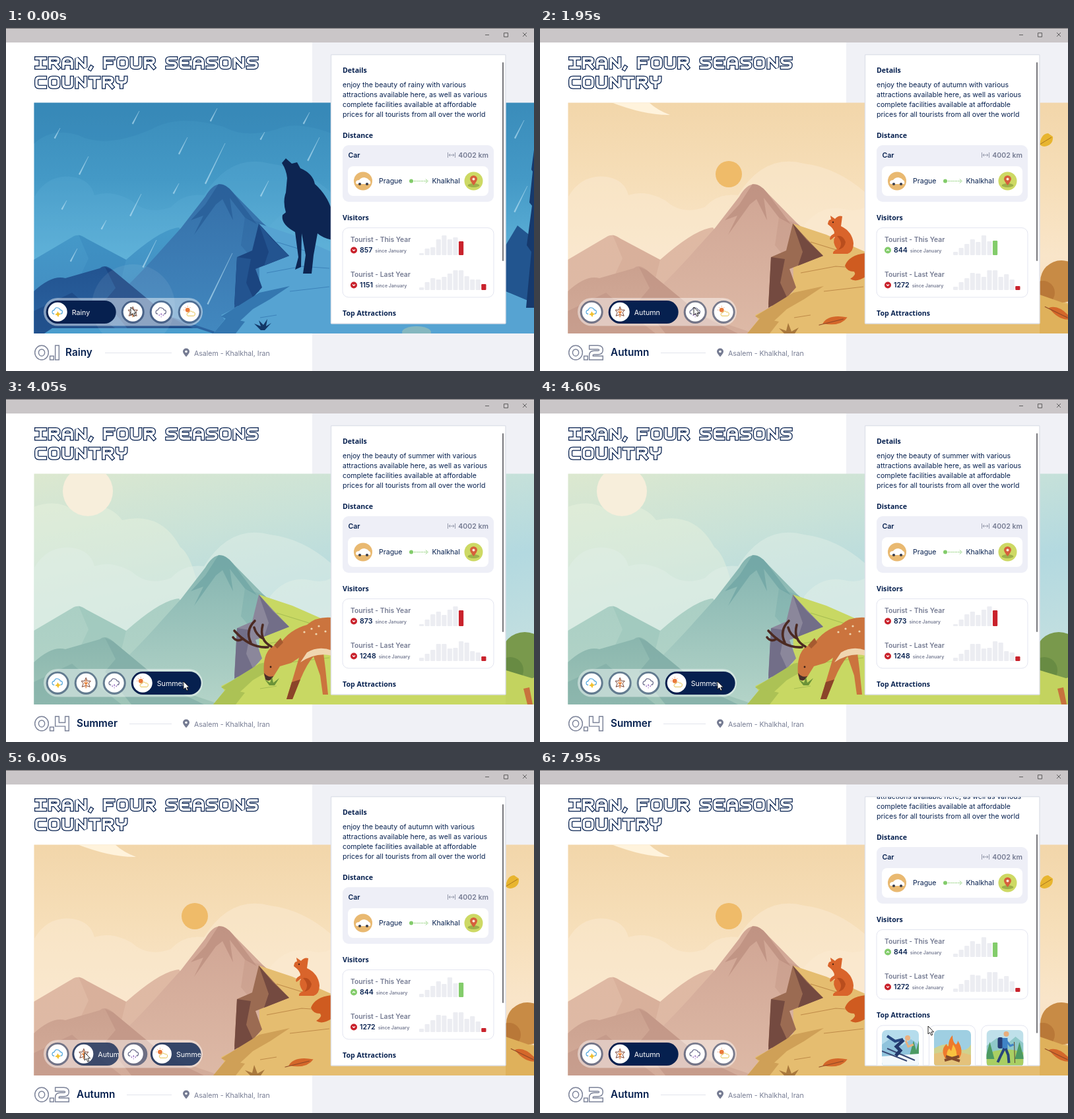
Animation of 800 by 521 pixels, one loop 8000 ms. Source, as an HTML page:

```html
<!DOCTYPE html>
<html lang="en">
<head>
<meta charset="utf-8">
<title>Four seasons</title>
<style>
html, body { margin: 0; width: 100%; height: 100%; overflow: hidden; background: #fff; }
svg { display: block; width: 100vw; height: 100vh; }
text { font: 400 10.55px Inter, sans-serif; fill: #06204f; }
.h { font: 700 10.6px "Open Sans", sans-serif; }
.b { font-weight: 600; }
.g { fill: #757b92; }
.title { font-weight: 600; font-size: 10.3px; }
.small { font-size: 7px; font-weight: 600; fill: #757b92; }
.name { font-size: 15.3px; font-weight: 600; }
.nav { fill: #fff; font-size: 10.7px; }
</style>
</head>
<body>
<svg id="stage" viewBox="0 0 800 521"></svg>
<script>
const NAVY = '#06204f', LOOP = 8000;
const path = (d, fill, more = '') => `<path d="${d}" fill="${fill}" ${more}/>`;
const line = (d, color, w = 1, more = '') => `<path d="${d}" fill="none" stroke="${color}" stroke-width="${w}" ${more}/>`;
const disc = (x, y, r, fill, more = '') => `<circle cx="${x}" cy="${y}" r="${r}" fill="${fill}" ${more}/>`;
const box = (x, y, w, h, r, fill, more = '') => `<rect x="${x}" y="${y}" width="${w}" height="${h}" rx="${r}" fill="${fill}" ${more}/>`;
const text = (x, y, s, cls = '', more = '') => `<text x="${x}" y="${y}" class="${cls}" ${more}>${s}</text>`;
const group = (id, s, more = '') => `<g id="${id}" ${more}>${s}</g>`;
const gradient = (id, colors, x2, y2) => `<linearGradient id="${id}" x2="${x2}" y2="${y2}">` +
  colors.map((c, i) => `<stop offset="${i / (colors.length - 1)}" stop-color="${c}"/>`).join('') + '</linearGradient>';

// Outlined display lettering, one stroke skeleton per glyph
const GLYPHS = {
  I: 'M0 0H13M6.5 0V14M0 14H13', R: 'M0 14V0H9Q13 0 13 3.5T9 7H0M7 7L13 14',
  A: 'M0 14V6Q0 0 6.5 0T13 6V14M0 8H13', N: 'M0 14V0L13 14V0', F: 'M0 14V0H13M0 7H10',
  O: 'M4 0H9Q13 0 13 4V10Q13 14 9 14H4Q0 14 0 10V4Q0 0 4 0Z',
  U: 'M0 0V10Q0 14 4 14H9Q13 14 13 10V0', S: 'M13 0H4Q0 0 0 3.5T4 7H9Q13 7 13 10.5T9 14H0',
  E: 'M13 0H4Q0 0 0 4V10Q0 14 4 14H13M0 7H10', C: 'M13 0H4Q0 0 0 4V10Q0 14 4 14H13',
  T: 'M0 0H13M6.5 0V14', Y: 'M0 0V3Q0 7 4 7H9Q13 7 13 3V0M6.5 7V14', ',': 'M1.5 13.5L0 16',
  0: 'M6.5 0A6.5 7 0 0 1 6.5 14A6.5 7 0 0 1 6.5 0Z', 1: 'M0 0V14', '.': 'M-.5 14h.01',
  2: 'M0 0H9Q13 0 13 3.5T9 7H4Q0 7 0 10.5V14H13', 4: 'M0 0V8H13M13 0V14',
};
const ADVANCE = { ',': 9, ' ': 13, '.': 6.5 };
function letters(str, x, y, scale, color) {
  let at = 3.1, out = '';
  for (const c of str) {
    const d = GLYPHS[c], cap = 'stroke-linecap="square" stroke-miterlimit="2"';
    if (d) out += `<g transform="translate(${at} 3.1)">${line(d, color, 6.2, cap)}${line(d, '#fff', 3.7, cap)}</g>`;
    at += ADVANCE[c] || 20.4;
  }
  return `<g role="img" aria-label="${str}" transform="translate(${x} ${y}) scale(${scale})">${out}</g>`;
}

// Landscapes: one shared composition in three palettes
function scene(id, p, sky, extras) {
  const fade = name => `url(#${id}${name})`;
  return group(id, gradient(id + 'Sky', p.sky, p.tilt, 1) + gradient(id + 'Peak', [p.peak, p.haze], 0, 1) +
    gradient(id + 'Far', [p.far, p.haze], 0, 1) + gradient(id + 'Front', [p.front, p.low], 0, 1) +
    box(42, 113, 758, 351, 0, fade('Sky')) + sky +
    path('M42 258Q62 222 100 226Q128 230 134 254Q160 245 190 262Q215 285 250 272Q270 250 300 254Q340 190 400 206Q450 212 493 250V464H42Z', p.cloud) +
    path('M400 300Q425 268 460 275Q480 280 493 272V464H400Z', p.cloud) +
    path('M42 352L103 316Q112 312 122 320L182 352Q235 305 262 303L330 400V464H42Z', fade('Far')) +
    path('M110 314L125 350L112 378L160 440L182 352L122 320Z', p.farShade, 'opacity=".45"') +
    path('M150 425Q205 372 238 334L265 304L302 256Q322 222 344 250L390 297L440 340V464H120Z', fade('Peak')) +
    path('M322 237L302 268L280 292L299 285L285 314L318 268L328 260L344 292L339 258L362 288L380 298L344 250Q334 237 322 237Z', p.shade, 'opacity=".65"') +
    path('M362 288L356 330L385 365L400 420H440V340L390 297Z', p.shade, 'opacity=".3"') +
    path('M42 400Q70 374 90 380L142 365Q150 358 162 368L245 437L325 464H42Z', fade('Front')) +
    path('M150 363L166 395L150 414L190 464H300L245 437L162 368Z', p.frontShade, 'opacity=".6"') +
    path('M42 430L100 402L130 428L175 464H42Z', p.frontShade, 'opacity=".5"') +
    path('M383 297L434 314L493 340L700 380L800 418V464H314L331 443L326 436L348 425L384 400Z', p.top) +
    path('M383 297L373 338L350 348L346 420L360 425L388 394L378 366L429 346L404 320Z', p.side) +
    path('M383 297L404 322L429 346L391 361L398 340Z', p.dark) +
    path('M350 348L371 351L364 387L374 409L346 425Z', p.dark) +
    path('M347 425L384 402L430 392L400 412L374 427L360 440L349 450L326 438Z', p.edge) +
    path('M314 464L334 440L362 446L348 464Z', p.edge) +
    line('M410 325L465 342M395 372L448 362L490 365M430 400L490 393M385 440L410 436', p.crack, 1.1) +
    extras, 'clip-path="url(#view)"');
}

function rainScene() {
  const drops = [[82, 152, 16], [125, 195, 28], [202, 126, 20], [320, 122, 20], [275, 166, 26], [332, 175, 62],
    [262, 236, 16], [92, 262, 14], [205, 252, 34], [343, 342, 78], [228, 322, 42], [398, 232, 24],
    [460, 128, 18], [475, 166, 36], [108, 335, 20], [152, 292, 14], [392, 158, 12], [785, 140, 28], [790, 240, 40]];
  const rain = drops.map(([x, y, n]) => path(`M${x} ${y}L${x - n * .47} ${y + n}L${x - 1.6 - n * .47} ${y + n - 1}Z`, '#b9e0f3', 'opacity=".7" stroke="#b9e0f3" stroke-width=".4"')).join('');
  const wolf = 'M418 205L424 198L433 206L441 204L446 213Q465 221 468 237Q487 254 494 278V322Q480 319 472 312L466 345L463 373H450L454 345L448 312L447 363L438 367L443 348L438 310Q416 298 419 284L424 280Q419 263 424 250L426 228Q425 216 418 205Z';
  return scene('rain', {
    tilt: 0, sky: ['#3a8cba', '#4499c6', '#5eb1d8', '#54a4d0'], cloud: '#5fb0d740', far: '#459ac9', farShade: '#3885ba',
    peak: '#356fa8', haze: '#4288bf', shade: '#255a94', front: '#225390', low: '#2c65a2', frontShade: '#183f7b',
    top: '#56a3d2', side: '#1b4580', dark: '#235490', edge: '#3477b0', crack: '#3d83ba',
  }, path('M42 113H493V160Q440 140 410 154Q360 168 330 150Q260 130 220 154Q150 184 110 163Q70 150 42 176Z', '#307fae', 'opacity=".3"'),
  path('M757 330L775 300L800 320V418L757 400Z', '#22558f') + path('M800 185L796 215L798 218L793 265L797 270L789 330L796 340L788 425H800Z', '#16396c') +
    path('M58 464L70 456H290L314 464Z', '#4a9dcd') +
    path('M376 449L386 453L383 444L390 451L396 442L394 453L402 448L392 459H386Z', '#123767') +
    `<ellipse cx="622" cy="462" rx="22" ry="9" fill="#cbd4a4" opacity=".4"/>` +
    disc(193, 422, 63, '#fff', 'opacity=".07"') + path(wolf, '#0d2552') + rain);
}

function autumnScene() {
  const leaf = (x, y, a, c) => `<g transform="translate(${x} ${y}) rotate(${a})">${path('M-20 3Q-10 -11 18 -3Q6 11 -20 3Z', c)}${line('M-26 5L12 -1', '#8d4726')}</g>`;
  return scene('autumn', {
    tilt: 0, sky: ['#f2d6aa', '#f6deb8', '#f9e5c9', '#f4d9ba'], cloud: '#fbead288', far: '#dfb9a3', farShade: '#d0a590',
    peak: '#d0a594', haze: '#ddb9a6', shade: '#b98a7c', front: '#cba18f', low: '#d3ac9a', frontShade: '#be9283',
    top: '#e5bd70', side: '#9b6b52', dark: '#744a40', edge: '#cfa057', crack: '#bf8b49',
  }, disc(286, 222, 20, '#efbb69') + path('M108 113H165Q178 125 197 132Q160 133 108 113Z', '#fff3dc'),
  disc(790, 385, 32, '#c88b45') + disc(762, 402, 18, '#b97838') + path('M757 405L800 420V464H757Z', '#dfb15b') +
    path('M757 176Q760 160 770 160L777 165Q778 178 764 180Q758 179 757 176Z', '#e8b52f') + line('M757 177Q765 172 775 166', '#a9751f') +
    leaf(448, 444, -5, '#d4672a') + leaf(789, 434, 35, '#d4672a') +
    path('M370 464L362 456L373 460L376 448L381 461L392 455L386 464Z', '#a9783c') +
    path('M462 361Q468 345 493 342V378Q479 387 470 381Q480 375 476 370Q465 370 462 361Z', '#cf5b20') +
    path('M436 298Q437 290 441 291L440 285L447 290Q452 284 458 286Q457 294 456 301Q473 309 475 327Q475 340 466 343H444Q443 339 450 336Q442 325 447 317L440 322Q437 317 446 312Q446 305 436 298Z', '#d9642b') +
    path('M450 316Q459 314 463 325Q462 334 452 337Q461 327 450 316Z', '#b94d1d') + disc(444, 295, 1.2, '#4b2416'));
}

function summerScene() {
  const deer = 'M494 332Q470 330 456 343Q430 350 415 372L403 376Q388 388 391 420Q396 430 405 422L415 406L432 401L444 393L433 430L425 456H434L446 426Q456 402 466 391L476 420L480 449H488L484 410L481 386L494 390Z';
  return scene('summer', {
    tilt: .5, sky: ['#dce8cf', '#c9e2d8', '#b3d9e0', '#c3dfe0'], cloud: '#e2efe880', far: '#aacfc4', farShade: '#95c0b7',
    peak: '#84b4b0', haze: '#b4d4c8', shade: '#6aa2a2', front: '#8ab6ae', low: '#9fc5b8', frontShade: '#7ca9a4',
    top: '#c8d863', side: '#8b879b', dark: '#726e88', edge: '#acc255', crack: '#a6bd52',
  }, path('M42 164Q80 150 106 172Q150 150 176 184Q235 170 264 225Q300 250 310 464H42Z', '#e9f1de', 'opacity=".45"') + disc(124, 140, 38, '#f7eedb'),
  disc(786, 390, 36, '#79994c') + disc(764, 412, 20, '#688b43') + path('M757 412L800 425V464H757Z', '#c3d35f') +
    path('M784 440L793 438L798 464H790Z', '#c8723d') +
    path(deer, '#cb743e') + path('M456 385Q474 374 494 382V390Q470 384 446 400Z', '#f0d6b0') +
    path('M433 430L425 456H434L446 426Z', '#8b4529') +
    [[452, 354], [463, 349], [474, 345], [470, 357], [484, 353]].map(([x, y]) => disc(x, y, 1.6, '#f0d6b0')).join('') +
    line('M397 377Q370 379 346 352M371 370Q362 352 377 337M359 364Q350 370 344 362M402 376Q383 366 389 343M390 364Q379 359 376 347', '#4c2a22', 3.6, 'stroke-linecap="round"') +
    path('M406 374L416 363L420 370L411 379Z', '#a55a30') + disc(401, 407, 1.4, '#3a1f18') + path('M391 416Q397 424 405 421Q400 431 393 426Z', '#49302a') +
    path('M392 426L400 431L403 422L405 431L414 424L407 435H399Z', '#6b9338'));
}

// Seasons
const SEASONS = {
  rain: { word: 'rainy', name: 'Rainy', num: '0.1', x: 90, rule: 150, now: 857, last: 1151, up: false,
    a: [3, 10, 12, 24, 30, 24, 27, 21], b: [4, 12, 18, 16, 20, 25, 30, 30, 21, 16, 16, 9] },
  autumn: { word: 'autumn', name: 'Autumn', num: '0.2', x: 107, rule: 183, now: 844, last: 1272, up: true,
    a: [5, 11, 17, 24, 20, 30, 21, 22], b: [5, 12, 18, 26, 25, 20, 30, 30, 20, 24, 16, 6] },
  summer: { word: 'summer', name: 'Summer', num: '0.4', x: 107, rule: 187, now: 873, last: 1248, up: false,
    a: [3, 10, 18, 22, 17, 25, 30, 24], b: [5, 11, 17, 26, 26, 19, 20, 30, 28, 15, 13, 7] },
};
const RED = '#c9222c', GREEN = '#83cc6b';

function visitors(y, title, count, bars, up) {
  const color = up ? GREEN : RED, t = up ? -1 : 1;
  return text(522, y, title, 'title g') + disc(527, y + 12.5, 5, color) +
    line(`M525 ${y + 12.5 - t}l2 ${2 * t}l2 ${-2 * t}`, '#fff', 1.2) +
    text(536, y + 16, `${count}<tspan class="small" dx="4">since January</tspan>`, 'b') +
    bars.map((h, i) => box(626 + i * 8.57, y + 20 - h, 7.2, h, 1.2, i === bars.length - 1 ? color : '#ecedf2')).join('');
}

function seasonPanel(key) {
  const s = SEASONS[key];
  const words = [`enjoy the beauty of ${s.word} with various`, 'attractions available here, as well as various',
    'complete facilities available at affordable', 'prices for all tourists from all over the world'];
  return group(key + 'Info', words.map((w, i) => text(510, 90 + i * 15, w)).join('') +
    visitors(325, 'Tourist - This Year', s.now, s.a, s.up) + visitors(378, 'Tourist - Last Year', s.last, s.b, false));
}

const seasonLabel = key => {
  const s = SEASONS[key];
  return group(key + 'Label', letters(s.num, 43, 481.5, 1.15, '#7b8298') + text(s.x, 498, s.name, 'name') + line(`M${s.rule} 493.5H251`, '#e2e4ec'));
};

function attraction(x, name, art) {
  return box(x, 449, 70, 92, 9, '#fff', 'stroke="#e3e5f0"') +
    `<svg x="${x + 7.5}" y="456" width="56" height="56" viewBox="0 0 56 56"><g clip-path="url(#thumb)">${art}</g></svg>` +
    text(x + 35, 530, name, '', 'text-anchor="middle"');
}

const pines = (y, ...xs) => xs.map(x => path(`M${x} ${y}L${x + 7} ${y + 26}H${x - 7}Z`, '#4c9a63')).join('');
const ski = box(0, 0, 56, 56, 0, '#b5dcec') + path('M0 22L14 12L30 24L44 14L56 22V56H0Z', '#8fc3dc') + pines(16, 48, 56) +
  path('M0 40L56 36V56H0Z', '#f3f8fb') + line('M0 32L38 47M8 28L50 46', '#3a4a76', 2) +
  line('M32 14L20 17L8 9', '#27477f', 4) + line('M33 15L22 25L28 31L21 39', '#22386b', 5) + line('M36 16L40 25L48 22', '#e9b07b', 3) + disc(39, 12, 4, '#eab181');
const fire = box(0, 0, 56, 56, 0, '#9fcfe2') + path('M0 28Q20 16 34 26T56 22V56H0Z', '#cfd28e') + path('M0 36Q28 28 56 38V56H0Z', '#e4c27b') +
  path('M17 43Q9 30 19 21Q20 26 22 24Q22 14 28 8Q28 18 33 22Q36 20 36 16Q46 32 38 43Z', '#ee7a2d') +
  path('M21 43Q17 34 23 28L26 32L29 22Q36 32 34 43Z', '#f9c23f') + line('M16 46L38 40M18 40L39 47', '#824a2b', 4);
const hike = box(0, 0, 56, 56, 0, '#bfe0ea') + path('M0 24L16 12L30 22L44 10L56 20V56H0Z', '#8fc8c9') + path('M0 36Q28 24 56 34V56H0Z', '#a9cf63') +
  pines(18, 5, 50) + box(17, 11, 8, 17, 3, '#273e75') + line('M28 12V29', '#3f83c6', 8) + line('M27 28L22 38L17 49M29 28L33 38L34 50', '#27437c', 4) +
  line('M29 15L36 24L41 22', '#3f83c6', 3) + line('M42 18L43 50', '#5b4636') + disc(30, 6, 4, '#e7ad7c');

const panel = text(510, 68, 'Details', 'h') + text(510, 167, 'Distance', 'h') +
  box(510, 178, 229, 86, 9, '#eeeff7') + text(518.5, 197, 'Car', 'b') +
  line('M669.5 189V197M680.5 189V197M671 193H679M673 191L671 193L673 195M677 191L679 193L677 195', '#8b90a3', .9) +
  text(731, 197, '4002 km', 'b g', 'text-anchor="end"') + box(518, 210, 213, 45, 8, '#fff') +
  disc(541, 232.5, 14, '#e9b971') + path('M530 235Q530 231 535 231Q538 227 543 227Q548 228 550 231Q553 232 552 237H531Z', '#fff') +
  disc(536, 237, 2.1, '#3b3f4d') + disc(547, 237, 2.1, '#3b3f4d') +
  text(565, 236, 'Prague') + disc(614, 232.5, 3, GREEN) + line('M618 232.5H637', GREEN, 1, 'stroke-dasharray="1.5 1"') + line('M636 229.5L639 232.5L636 235.5', GREEN) +
  text(645.5, 236, 'Khalkhal') + disc(708.5, 232.5, 14, '#cdd964') + '<ellipse cx="708.5" cy="239" rx="9" ry="3" fill="#9db04a"/>' +
  path('M708.5 239Q703 232 703 229.5A5.5 5.5 0 0 1 714 229.5Q714 232 708.5 239Z', '#d65f3c') + disc(708.5, 229.5, 2, '#fbe8d4') +
  text(510, 292, 'Visitors', 'h') + box(510, 303.5, 229, 105.5, 9, '#fff', 'stroke="#e3e5f0"') +
  Object.keys(SEASONS).map(seasonPanel).join('') + text(510, 437, 'Top Attractions', 'h') +
  attraction(510.5, 'Ski', ski) + attraction(589.5, 'Festival', fire) + attraction(669, 'Hiking', hike);

// Season switcher, icons centred on 0,0
const CLOUD = 'M-5 3Q-9 3 -8 -1Q-7 -3 -5 -3Q-3 -8 1 -6Q4 -5 4 -3Q8 -3 7 1Q7 3 4 3';
const ICONS = [
  line(CLOUD, '#4ba3dc', 1.2) + path('M0 -1L2 2L5 3L2 5L1 8L-1 5L-4 4L-1 2Z', '#f1c02f'),
  line('M0 -8L2 -3L7 -3L4 1L6 6L0 4L-6 6L-4 1L-7 -3L-2 -3Z', '#7a4434', 1) + line('M0 -5V8M0 2L3 -1M0 2L-3 -1', '#e4782c', 1.3),
  line(CLOUD, '#55587c', 1.1) + line('M-3 4V6M0 2V5M3 4V6M0 7V8', '#9a6fc2', 1.4),
  disc(-3, -3, 3.4, '#ea7a3a') + line('M-3 -9V-8M-9 -3H-8M-7 -7L-6.5 -6.5M1 -7L.5 -6.5', '#ea7a3a', 1.1) + path('M-3 6Q-6 2 -1 1Q1 -3 4 0Q9 0 8 4Q8 6 6 6Z', '#fff', 'stroke="#e3c14c" stroke-width="1"'),
];
const navItem = (icon, i) => group('item' + i, `<clipPath id="pill${i}"><rect id="cut${i}" y="414" height="35" rx="17.5"/></clipPath>` +
  `<rect id="bar${i}" y="414" height="35" rx="17.5" fill="${NAVY}"/>` +
  `<g clip-path="url(#pill${i})">${text(39, 436, ['Rainy', 'Autumn', 'Winter', 'Summer'][i], 'nav', `id="word${i}"`)}</g>` +
  disc(17.5, 431.3, 14.5, '#fff') + `<g transform="translate(17.5 431.3)">${icon}</g>`);

const stage = document.getElementById('stage');
stage.innerHTML = `<defs>
  <clipPath id="view"><rect x="42.5" y="113.5" width="758" height="350.5"/></clipPath>
  <clipPath id="frame"><rect x="493" y="41" width="264" height="407.5"/></clipPath>
  <clipPath id="thumb"><rect width="56" height="56" rx="7"/></clipPath></defs>` +
  box(0, 0, 800, 521, 0, '#fff') + box(464, 22, 336, 499, 0, '#f0f1f6') + box(0, 0, 800, 22, 0, '#cac6c8') + box(0, 0, 800, 1, 0, '#777577') +
  line('M726 10.5H732M754.5 7.5H760.5V13.5H754.5ZM783 7L789 13M789 7L783 13', '#555', .9) +
  letters('IRAN, FOUR SEASONS', 43, 43, 1, NAVY) + letters('COUNTRY', 43, 72.5, 1, NAVY) +
  rainScene() + autumnScene() + summerScene() +
  box(57, 410, 241, 42.5, 21.2, '#fff', 'opacity=".45"') + ICONS.map(navItem).join('') +
  Object.keys(SEASONS).map(seasonLabel).join('') +
  path('M273 499.5Q268 494 268 491.5A5 5 0 0 1 278 491.5Q278 494 273 499.5Z', '#757b92') + disc(273, 491.5, 1.8, '#fff') +
  text(285, 497.5, 'Asalem - Khalkhal, Iran', 'g') +
  box(492.5, 40.5, 264.5, 408.5, 1, '#fff', 'stroke="#dfe2ea" stroke-width="1.4"') +
  `<g clip-path="url(#frame)">${group('scroll', panel)}</g>` +
  `<rect id="thumbBar" x="752" width="2" height="302" rx="1" fill="#77777c"/>` +
  group('cursor', path('M0 0V12L2.8 9.6L4.8 14L6.8 13.1L4.9 8.9H8.6Z', '#fff', 'stroke="#111" stroke-width=".9"'));

const $ = id => document.getElementById(id);
const set = (id, attrs) => { for (const k in attrs) $(id).setAttribute(k, attrs[k]); };
const clamp = v => Math.min(1, Math.max(0, v));
const ease = v => { v = clamp(v); return v * v * (3 - 2 * v); };

// Each click: time, season, nav slots, and the wait before the picture shows
const CLICKS = [
  { at: -1000, key: 'rain', from: 0, to: 0, wait: 0, fade: 1 },
  { at: 60, key: 'autumn', from: 0, to: 1, wait: 250, fade: 200 },
  { at: 3465, key: 'summer', from: 1, to: 3, wait: 260, fade: 250 },
  { at: 5850, key: 'autumn', from: 3, to: 1, wait: 0, fade: 1 },
];
const CURSOR = [[0, 189, 424], [900, 189, 424], [1650, 233, 424], [1950, 233, 424], [2450, 276, 430], [2600, 276, 430],
  [3000, 313, 446], [3400, 269, 429], [5200, 269, 429], [5800, 119, 429], [6100, 119, 429], [6800, 588, 389], [LOOP, 588, 389]];

function drawNav(click, t) {
  const p = ease((t - click.at) / 300);
  const lo = Math.min(click.from, click.to), hi = Math.max(click.from, click.to);
  const open = ICONS.map((_, i) => i === click.to ? p : i === click.from ? 1 - p ** 1.3 :
    i > lo && i < hi ? .8 * p * (1 - p) ** 3 : 0);
  const widths = open.map(o => 35 + 71 * o);
  const gap = (235 - widths.reduce((a, b) => a + b)) / 3;
  let x = 60.7;
  widths.forEach((w, i) => {
    set('item' + i, { transform: `translate(${x} 0)` });
    set('bar' + i, { width: w, opacity: .5 + .5 * open[i] });
    set('cut' + i, { width: w });
    set('word' + i, { opacity: clamp(open[i] * 6) });
    x += w + gap;
  });
}

function draw(t) {
  const click = CLICKS.filter(c => c.at <= t).pop();
  for (const key in SEASONS) {
    const on = key === click.key;
    set(key, { opacity: on ? clamp((t - click.at - click.wait) / click.fade) : 0 });
    set(key + 'Info', { visibility: on ? 'visible' : 'hidden' });
    set(key + 'Label', { visibility: on ? 'visible' : 'hidden' });
  }
  drawNav(click, t);
  const y = 99 * ease((t - 6880) / 160) - 38 * ease((t - 7730) / 220);
  set('scroll', { transform: `translate(0 ${-y})` });
  set('thumbBar', { y: 52 + y * .75 });
  const i = CURSOR.findIndex(k => k[0] > t), a = CURSOR[i - 1], b = CURSOR[i];
  const u = ease((t - a[0]) / (b[0] - a[0]));
  set('cursor', { transform: `translate(${a[1] + (b[1] - a[1]) * u} ${a[2] + (b[2] - a[2]) * u})` });
}

const start = performance.now();
function tick() {
  draw((performance.now() - start) % LOOP);
  requestAnimationFrame(tick);
}
tick();
</script>
</body>
</html>
```
